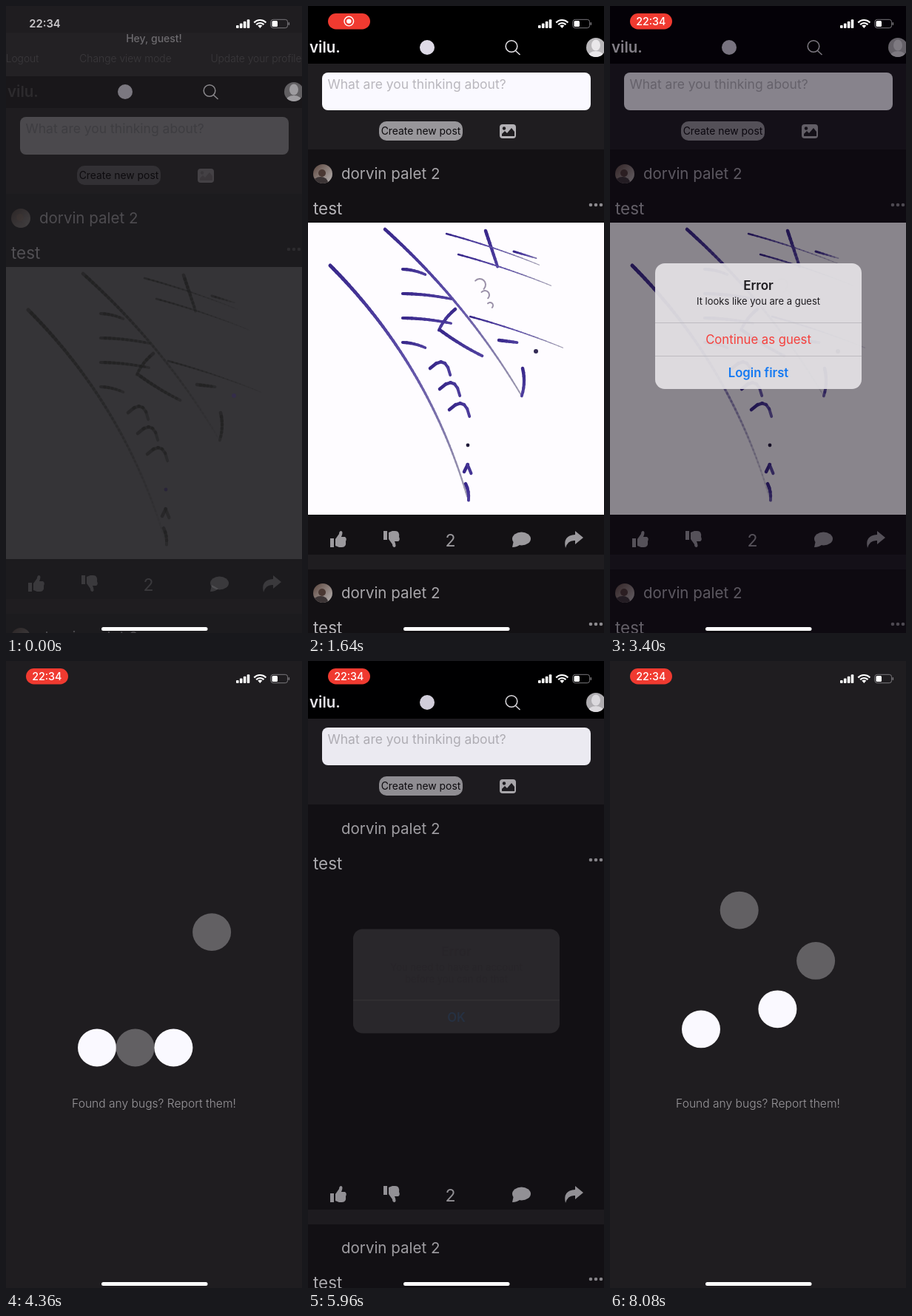
An HTML page with a canvas that plays this animation: 400x848 px, repeating every 8120 ms.

```html
<!DOCTYPE html>
<html lang="en">
<head>
<meta charset="utf-8">
<title>Guest feed</title>
<style>
html, body { margin: 0; width: 100%; height: 100%; overflow: hidden; background: #1f1d20; }
canvas { display: block; width: 400px; height: 848px; }
</style>
</head>
<body>
<canvas id="stage"></canvas>
<script>
const LOOP = 8120, W = 400, H = 848;
const BG = '#1f1d20', GREY = '#9b999d';
const canvas = document.getElementById('stage');
const ratio = window.devicePixelRatio || 1;
canvas.width = W * ratio;
canvas.height = H * ratio;
const g = canvas.getContext('2d');

const clamp = x => Math.max(0, Math.min(1, x));
const ramp = (t, from, to) => clamp((t - from) / (to - from));
const ease = x => x * x * (3 - 2 * x);
const times = (n, f) => { for (let i = 0; i < n; i++) f(i); };

function rect(x, y, w, h, color, r = 0) {
  g.fillStyle = color;
  g.beginPath();
  g.roundRect(x, y, w, h, r);
  g.fill();
}
function oval(x, y, rx, ry, color) {
  g.fillStyle = color;
  g.beginPath();
  g.ellipse(x, y, rx, ry, 0, 0, 7);
  g.fill();
}
const dot = (x, y, r, color) => oval(x, y, r, r, color);
function ring(x, y, r, width, color, from = 0, to = 7) {
  g.strokeStyle = color;
  g.lineWidth = width;
  g.beginPath();
  g.arc(x, y, r, from, to);
  g.stroke();
}
function text(s, x, y, size, color, weight = 400, align = 'left') {
  g.font = `${weight} ${size}px Inter, "Liberation Sans", sans-serif`;
  g.textAlign = align;
  g.fillStyle = color;
  g.fillText(s, x, y + size * 0.36);
}
function shape(d, color, x = 0, y = 0, flip = 1) {
  g.save();
  g.translate(x, y);
  g.scale(1, flip);
  g.fillStyle = color;
  g.fill(new Path2D(d));
  g.restore();
}

// Alerts: the layout follows from the number of text lines and buttons
const guest = {
  lines: ['It looks like you are a guest'],
  buttons: [['Continue as guest', '#f5403c', 400], ['Login first', '#1479f2', 600]]
};
const notice = {
  lines: ['You need to have an account', 'before you can do that'],
  buttons: [['OK', '#1479f2', 600]]
};
const alerts = [
  { box: guest, open: 2160, close: 3500 },
  { box: notice, open: 5300, close: 5784 },
  { box: guest, open: 6600, close: 7260 }
];
const fadeOut = (t, a) => 1 - ramp(t, a.close, a.close + 200);
const shade = t => alerts.reduce((s, a) =>
  t < a.open ? s : s + 0.48 * (1 - Math.exp((a.open - t) / 80)) * fadeOut(t, a), 0);

function drawAlert(t, a) {
  const age = t - a.open, out = fadeOut(t, a);
  if (age < 0 || !out) return;
  const { lines, buttons } = a.box;
  const h = 64 + 16 * lines.length + 45 * buttons.length;
  const k = 1 + 0.2 * Math.exp(-age / 111);
  g.save();
  g.translate(200.5, 433);
  g.scale(k, k);
  g.globalAlpha = clamp(age / 210) * out;
  rect(-139.5, -h / 2, 279, h, 'rgba(228,225,229,.93)', 13);
  text('Error', 0, 30 - h / 2, 17, '#1d1b1f', 600, 'center');
  lines.forEach((s, i) => text(s, 0, 51.5 + 16 * i - h / 2, 13, '#1d1b1f', 400, 'center'));
  buttons.forEach(([s, color, weight], i) => {
    const y = h / 2 - 45 * (buttons.length - i);
    rect(-139.5, y, 279, 0.8, '#b3b0b6');
    text(s, 0, y + 23, 16.7, color, weight, 'center');
  });
  g.restore();
}

// Feed
function portrait(y) {
  g.save();
  g.beginPath();
  g.arc(20, y, 13, 0, 7);
  g.clip();
  const fill = g.createLinearGradient(8, y - 12, 32, y + 12);
  fill.addColorStop(0, '#5f4a42');
  fill.addColorStop(1, '#b5b0af');
  rect(6, y - 14, 28, 28, fill);
  dot(19, y - 1, 5, '#4a3833');
  oval(17, y + 12, 10, 8, '#3b3435');
  g.restore();
}

// Pen marks thin out and pale towards their end; `fine` sets how much of the tail shows
function scribble(fine, base, p) {
  const pen = (x, y, dx, dy, bend = 0, width = 4.5, pale = 0.3) => {
    const len = Math.hypot(dx, dy), n = Math.ceil(len / 6);
    const cx = dx / 2 + bend * dy / len, cy = dy / 2 - bend * dx / len;
    const at = u => [x + 2 * u * (1 - u) * cx + u * u * dx, y + 2 * u * (1 - u) * cy + u * u * dy];
    times(n, i => {
      const u = i / n, tone = u * pale;
      g.globalAlpha = base * (1 - tone * (1 - fine));
      g.strokeStyle = `hsl(250 ${55 * p * (1 - tone * 0.8)}% ${12 + 23 * p + 30 * tone * p}%)`;
      g.lineWidth = width * (1 - tone * 0.6);
      g.beginPath();
      g.moveTo(...at(u));
      g.lineTo(...at(u + 1.1 / n));
      g.stroke();
    });
  };
  g.lineCap = 'round';
  pen(30, 351, 185, 312, 46, 5, 1);
  pen(104, 302, 184, 224, 22, 4.5, 1);
  pen(240, 304, 16, 48);
  times(3, i => {
    const y = 308 + 28 * i * i;
    g.globalAlpha = base * fine;
    ring(232 + 7 * i, 377 + 14 * i, 8 - 2 * i, 2, '#9a90a8', -2.4, 0.8);
    pen(187 + 16 * i, y, 125, 42, 4, 2.4, 0.9 + 0.1 * fine);
    pen(178 + 13 * i - 13, 490 + 28 * i, 27, 8, 26, 4.5);
  });
  times(4, i => pen(128, 356 + 33 * i, 30 + 40 * Math.sin(Math.PI * i / 3), 7, 3, 4.2));
  pen(199, 410, -22, 28, -4);
  pen(178, 438, 57, 35, -3);
  times(2, i => pen(211 + 2 * i, 630 + 16 * i, 9 - 5 * i, 22 * i, 20 - 17 * i));
  pen(290, 490, -1, 37, 5);
  pen(258, 452, 24, 3);
  pen(278, 332, 30, 9, 0, 3, 0.8);
  g.globalAlpha = base;
  dot(216, 594, 2.4, '#211b3a');
  dot(308, 467, 3, '#332a55');
}

const thumb = 'M-11 -1h5v12h-5zM-4 0L1 -7Q1 -11 4 -11Q7 -10 4 -3H9Q12 -1 10 3Q11 11 5 11H1L-4 9z';

function postHead(y, a, loaded) {
  g.globalAlpha = a(0.25) * loaded;
  portrait(y);
  g.globalAlpha = a(0.35);
  text('dorvin palet 2', 45, y, 20.5, '#a9a7ab');
  text('test', 7, y + 47, 22.4, '#b5b3b7');
  g.globalAlpha = a(0.15);
  times(3, i => dot(382 + 7 * i, y + 42, 2.3, '#8c8a8e'));
}

function drawMenu(off) {
  const y = off - 60;
  g.globalAlpha = off / 60;
  rect(0, y + 36, W, 59, '#232124');
  text('Hey, guest!', 200, y + 44, 14, '#6d6b6f', 500, 'center');
  ['Logout', 'Change view mode', 'Update your profile'].forEach((s, i) =>
    text(s, 22 + 139.5 * i + 37 * Math.max(0, i - 1), y + 71, 13.8, '#3b393c', 300, 'center'));
}

function drawFeed(t) {
  const p = ease(ramp(t, 0, 330));
  const a = start => start + (1 - start) * p;
  const off = 60 * (1 - ease(ramp(t, 160, 440)));
  const loaded = t < 5000 ? 1 : ramp(t, 6080, 6280);

  rect(0, 0, W, H, BG);
  if (off > 0) drawMenu(off);

  g.save();
  g.translate(0, off);
  g.globalAlpha = a(0.15);
  rect(0, 194, W, 548, '#131114');
  rect(0, 762, W, 90, '#131114');

  g.globalAlpha = a(0.2);
  rect(19, 90, 363, 51, '#faf9ff', 8);
  g.globalAlpha = a(0.5);
  text('What are you thinking about?', 26.5, 106, 17.5, `hsl(260 4% ${20 + 53 * p}%)`);
  g.globalAlpha = a(0.16);
  rect(96, 156, 113, 26, '#98969a', 10);
  g.globalAlpha = 1;
  text('Create new post', 152.5, 169, 13.9, '#0d0b0e', 400, 'center');
  g.globalAlpha = a(0.25);
  rect(259, 160, 22, 19, '#b3b1b5', 4);
  dot(265, 165.5, 2.2, BG);
  shape('M262 176v-3l4-4 3 3 6-7 4 5v6z', BG);

  postHead(227, a, loaded);
  if (loaded) {
    g.globalAlpha = a(0.11) * loaded;
    rect(0, 293, W, 395, '#fefcff');
    const fine = ease(ramp(t, 150, 500)) * (1 - 1.6 * shade(t));
    scribble(Math.max(0, fine), a(0.6) * loaded, p);
  }
  g.globalAlpha = a(0.24);
  shape(thumb, GREY, 41, 721);
  shape(thumb, GREY, 113, 721, -1);
  text('2', 192.5, 723, 23, GREY, 400, 'center');
  oval(288.5, 720.5, 12.5, 9, GREY);
  shape('M278 723L276 732Q283 732 287 728z', GREY);
  shape('M361 710L372 719L361 728V723Q351 722 348 733Q344 716 361 715z', GREY);
  postHead(794, a, loaded);
  g.restore();

  drawNav(t, a, off);
}

function drawNav(t, a, off) {
  const top = off * 95 / 60;
  g.globalAlpha = a(0.2);
  rect(0, top, W, 78 + off - top, '#000');
  g.save();
  g.translate(0, off);
  g.globalAlpha = a(0.09);
  text('vilu.', 2, 56, 20.5, '#f1eff3', 600);
  const press = ramp(t, 400, 500) * (1 - ramp(t, 580, 740));
  g.globalAlpha = a(0.5) * (1 - 0.78 * press);
  dot(161, 56, 10, '#dedae6');
  g.globalAlpha = a(0.55);
  ring(275, 54.5, 7.8, 1.5, '#e8e6ea');
  g.beginPath();
  g.moveTo(280.5, 60.5);
  g.lineTo(286.5, 66);
  g.stroke();
  g.globalAlpha = a(0.45);
  g.beginPath();
  g.arc(389, 56, 13, 0, 7);
  g.clip();
  rect(375, 42, 28, 28, '#b9b7ba');
  oval(389, 53, 6, 7.5, '#e9e7ea');
  oval(389, 69, 11, 8, '#e9e7ea');
  g.restore();
  g.globalAlpha = 1;
}

// Loading screen: each ball hops in turn, then rests
const loads = [
  { from: 4150, start: 4200, to: 5120 },
  { from: 7600, start: 7632, to: 9000 }
];
const delays = [0.76, 0.42, 0.716, 0];

function drawLoading(t) {
  for (const { from, start, to } of loads) {
    const alpha = ramp(t, from, from + 40) * (1 - ramp(t, to, to + 200));
    if (!alpha) continue;
    g.globalAlpha = alpha;
    rect(0, 0, W, H, BG);
    delays.forEach((d, i) => {
      const u = Math.max(0, (t - start) / 560 - d) % 1.79;
      const lift = u < 1 ? 200 * Math.sin(Math.PI * u) : 0;
      oval(123 + 51.7 * i, 523 - lift, 26, 25.4, i % 2 ? '#626063' : '#faf9ff');
    });
    text('Found any bugs? Report them!', 200, 598, 15.6, GREY, 300, 'center');
    g.globalAlpha = 1;
  }
}

function drawStatus(t) {
  const pill = ramp(t, 200, 360);
  g.globalAlpha = 1 - pill;
  text('22:34', 52.5, 24, 14.8, '#c9c7ca', 600, 'center');
  g.globalAlpha = pill;
  rect(27, 10, 57, 21.5, '#f03a30', 10.7);
  if (t < 3000) {
    ring(55.3, 20.6, 6.3, 1.4, '#fff');
    dot(55.3, 20.6, 3.2, '#fff');
  } else {
    text('22:34', 55.3, 20.8, 14.3, '#fff', 500, 'center');
  }
  g.globalAlpha = 1;
  times(4, i => rect(311 + i * 4.9, 26 - i * 2.6, 3.6, 4 + i * 2.6, '#fff', 1));
  g.lineCap = 'butt';
  times(2, i => ring(343.3, 30, 11 - 4 * i, 2.2, '#fff', -Math.PI * 0.76, -Math.PI * 0.24));
  shape('M343.3 30L340.3 26.6Q343.3 24.4 346.3 26.6z', '#fff');
  g.strokeStyle = '#7b797d';
  g.lineWidth = 1;
  g.beginPath();
  g.roundRect(357.8, 18.3, 22.8, 11.4, 3.3);
  g.stroke();
  rect(359.5, 20, 7.5, 8, '#fff', 1.5);
  rect(381.6, 22, 1.5, 4, '#7b797d', 1);
  rect(129, 840, 143.5, 5, '#fff', 2.5);
}

function draw(t) {
  g.setTransform(ratio, 0, 0, ratio, 0, 0);
  g.globalAlpha = 1;
  drawFeed(t);
  drawLoading(t);
  const dim = shade(t);
  if (dim > 0) rect(0, 0, W, H, `rgba(9,3,16,${dim})`);
  alerts.forEach(a => drawAlert(t, a));
  drawStatus(t);
}

let begin;
function frame(now) {
  if (begin === undefined) begin = now;
  draw((now - begin) % LOOP);
  requestAnimationFrame(frame);
}
draw(0);
requestAnimationFrame(frame);
</script>
</body>
</html>
```
